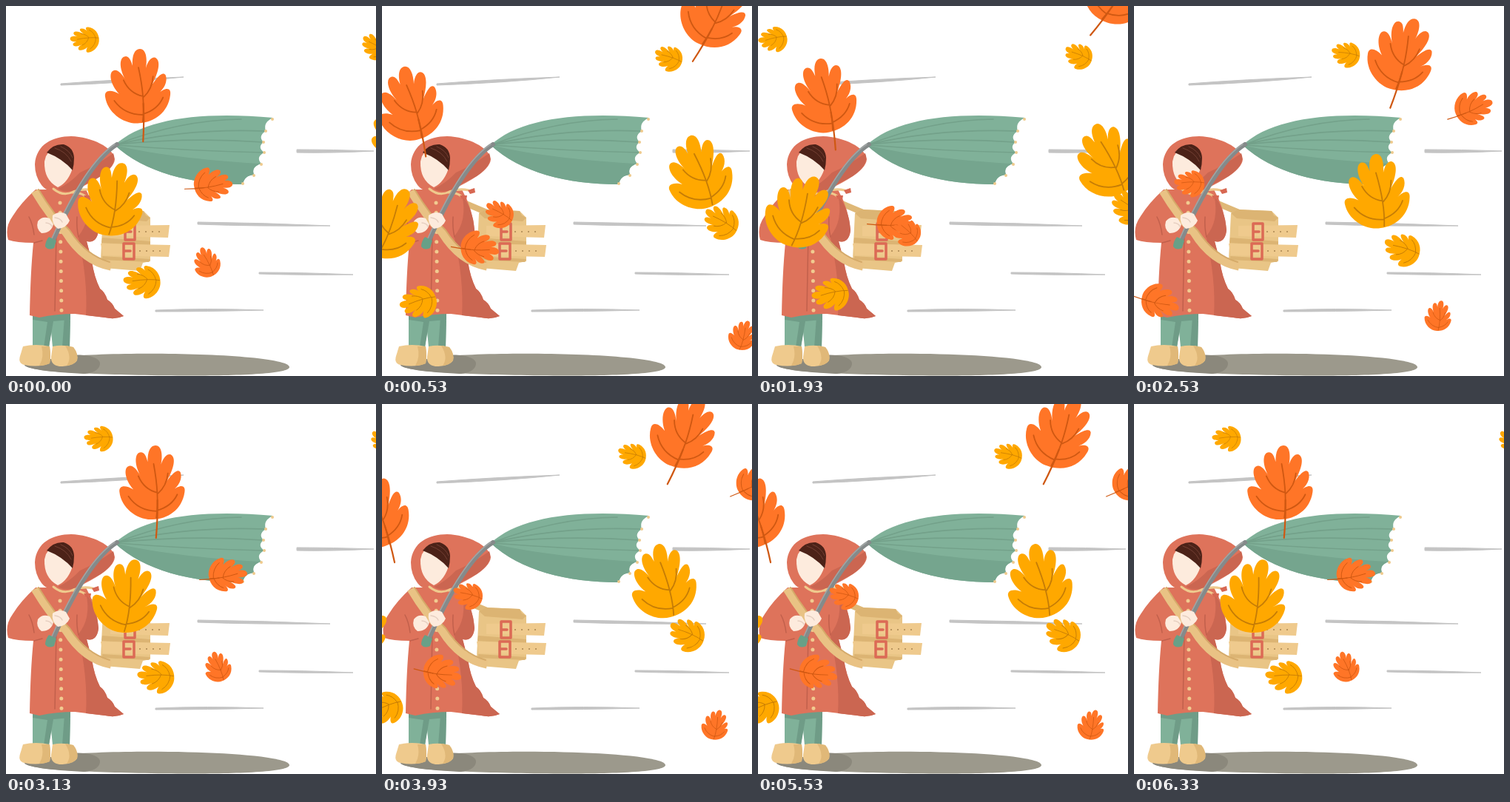
An HTML page for the animation above (6410 ms loop, 500 by 500 pixels).

```html
<!DOCTYPE html>
<html lang="en">
<head>
<meta charset="utf-8">
<title>Autumn wind</title>
<style>
html, body { margin: 0; width: 100%; height: 100%; overflow: hidden; background: #fff; }
svg { display: block; width: 100vw; height: 100vh; }
.line { fill: none; stroke-linecap: round; stroke-linejoin: round; }
.orange { color: #ff7527; --vein: #cf5812; }
.yellow { color: #ffa800; --vein: #c57c06; }
</style>
</head>
<body>
<svg viewBox="0 0 500 500">
  <defs>
    <g id="leaf">
      <path fill="currentColor" d="M0 50C-20 51 -42 34 -44 12C-45 3 -36 2 -25 9C-37 -5 -38 -22 -30 -23C-25 -24 -20 -18 -15 -9C-24 -26 -22 -41 -14 -41C-9 -41 -7 -36 -5 -28C-5 -42 -1 -50 6 -50C14 -50 16 -38 13 -24C17 -36 24 -40 28 -36C34 -30 28 -14 20 -1C30 -14 36 -18 39 -13C42 -4 36 6 27 12C38 3 46 4 44 14C40 38 20 50 0 50Z"/>
      <path class="line" stroke="var(--vein)" stroke-width="1.8" d="M3 -25Q10 18 5 48M6 39Q-19 38 -32 18M6 38Q26 33 34 17M7 14Q-11 9 -18 -9M8 15Q20 5 22 -12"/>
    </g>
    <g id="stemmed">
      <use href="#leaf"/>
      <path class="line" stroke="var(--vein)" stroke-width="2.2" d="M7 24Q7 48 4 75"/>
    </g>
  </defs>

  <path fill="#c4c4c4" stroke="#c4c4c4" d="M74 105Q150 99 240 96Q165 104 74 107ZM393 194Q440 194 497 196Q440 199 393 198ZM259 292Q350 293 438 297Q340 298 259 295ZM342 360Q400 360 469 363Q400 364 342 362ZM202 411Q270 408 348 411Q270 413 202 413Z"/>

  <path fill="#9c998c" d="M75 474C170 465 383 470 383 488C383 503 200 500 120 497C70 495 30 492 25 485Z"/>
  <path fill="#8b887c" d="M75 474C100 468 127 473 127 483C127 492 115 497 105 497C60 495 25 490 25 485Z"/>

  <!-- legs and boots -->
  <path fill="#80b199" d="M36 414H87L86 461H63L61 440L58 461H36Z"/>
  <path fill="#6f9c87" d="M36 416H87V424L64 426L58 461H51L56 427L36 424ZM79 420H87L86 461H76Z"/>
  <path fill="#efca8d" d="M23 460Q40 456 59 460Q61 474 59 483Q44 489 25 485Q16 483 19 473Z"/>
  <path fill="#efca8d" d="M63 460Q77 457 91 461Q98 470 96 479Q90 487 72 487Q60 485 61 474Z"/>
  <path fill="#e0b878" d="M48 460L59 460Q61 474 59 483Q53 486 45 486Q52 474 48 460ZM80 459L91 461Q98 470 96 479Q92 485 82 486Q90 475 80 459Z"/>

  <!-- satchel -->
  <path class="line" stroke="#dfb877" stroke-width="8" d="M102 262Q120 270 142 279"/>
  <path fill="#e9c586" d="M131 280L140 275L186 277L195 286V345L185 347L181 358L133 354L128 342Z"/>
  <path fill="#dcb473" d="M131 280L140 275L186 277L189 283L195 286L190 291L139 287ZM130 313L195 318V324L129 320ZM130 338L195 342L193 346L130 343Z"/>
  <path fill="#efca8d" d="M141 297L221 296L219 313L141 311ZM128 321L222 323L220 339L131 337Z"/>
  <path class="line" stroke="#a88450" stroke-width="2" stroke-dasharray="0 9" d="M180 305H216M181 331H216"/>
  <path class="line" stroke="#dc6a55" stroke-width="3.5" d="M161 294H174V316H161ZM159 321H173V342H159ZM161 305H169M159 331H168"/>

  <!-- coat -->
  <path fill="#de735b" d="M40 248L108 248Q123 275 125 303Q123 321 109 318L116 345Q119 366 127 382Q134 387 137 397Q144 401 147 409L159 419Q148 424 134 421L93 416Q68 416 45 421L32 418Q33 360 37 320Q14 320 3 316Q-2 299 9 284Q20 266 40 248Z"/>
  <path fill="#cb6651" d="M97 309L109 318L116 345Q119 366 127 382Q134 387 137 397Q144 401 147 409L159 419Q148 424 134 421L108 418Q111 370 97 309ZM108 255Q123 275 125 303Q123 321 109 318L97 312Q116 290 108 255Z"/>
  <path class="line" stroke="#c1604c" stroke-width="1.5" d="M38 320L49 317M31 285Q36 294 38 309M68 308L66 412M96 285Q95 300 98 312"/>
  <path class="line" stroke="#f1cb90" stroke-width="5" stroke-dasharray="0 13.2" d="M73 266L75 412"/>
  <path class="line" stroke="#e9c284" stroke-width="11" style="stroke-linecap:butt" d="M39 250Q60 285 81 306Q105 345 142 352"/>
  <path class="line" stroke="#d5aa69" stroke-width="2" d="M44 248Q65 283 86 303Q108 337 140 346"/>

  <!-- hood and face -->
  <path fill="#de735b" d="M39 214C41 187 63 176 88 176C116 177 145 191 147 207C146 224 111 240 94 249C76 257 55 252 48 242Q39 230 39 214Z"/>
  <path fill="#cb6651" d="M145 199Q151 214 128 230Q106 241 93 249Q80 253 70 247Q86 240 100 225Q121 216 145 199Z"/>
  <path fill="#fdebdd" d="M54 203Q60 191 75 190Q91 198 91 216Q85 238 70 245Q51 235 52 210Z"/>
  <path fill="#4c2218" d="M55 198Q64 186 78 187Q91 191 92 205Q92 214 90 222Q76 206 55 198Z"/>
  <path class="line" stroke="#744034" stroke-width="1" d="M66 192Q82 197 88 210M74 190Q86 195 90 205"/>
  <path class="line" stroke="#efca8d" stroke-width="3" d="M64 247Q77 258 91 251Q104 246 117 249M90 252Q101 252 107 257"/>
  <path fill="#d76752" d="M116 249L125 246L126 252L119 254ZM105 256L115 256L114 262L107 260Z"/>

  <!-- umbrella -->
  <path fill="#80b199" d="M147 188C185 152 265 142 361 151Q347 157 351 169Q340 176 348 184Q339 191 349 198Q337 204 345 213Q331 217 335 228Q322 229 320 241C250 241 187 225 147 188Z"/>
  <path fill="#75a58e" d="M147 188C205 202 285 210 345 213Q331 217 335 228Q322 229 320 241C250 241 187 225 147 188Z"/>
  <path class="line" stroke="#73a18a" stroke-width="1.6" d="M150 187Q235 154 318 153M150 187Q245 165 350 169M150 187Q250 177 347 184M150 188Q250 196 348 198"/>
  <path class="line" stroke="#efca8d" stroke-width="4" d="M360 153h0M351 169h0M348 184h0M349 198h0M345 214h0M335 229h0M320 240h0"/>
  <path class="line" stroke="#858a8a" stroke-width="6" d="M150 187Q111 211 64 316"/>
  <path class="line" stroke="#a0a5a4" stroke-width="1.5" d="M147 187Q108 211 62 314"/>
  <path fill="#68a087" d="M58 312L68 317L65 327Q57 331 53 325Q53 318 58 312Z"/>
  <path fill="#fdebdd" d="M43 291Q49 283 59 287L64 295Q61 307 48 307Q40 301 43 291ZM63 283Q72 276 81 281L86 290Q82 300 70 301Q61 294 63 283Z"/>
  <path class="line" stroke="#e6cfc0" stroke-width="1.5" d="M54 293Q61 294 62 298M66 286Q74 287 76 292"/>

  <g id="leaves"></g>
</svg>
<script>
const LOOP = 6410, CYCLE = 1600, FLIGHT = 2800;
const EARLY = -70, LATE = 330;

// A leaf drifts along one curve while its tilt bends from the first to the last angle.
const leaf = (kind, shape, size, start, curve, tilt) => {
  const route = document.createElementNS("http://www.w3.org/2000/svg", "path");
  route.setAttribute("d", curve);
  return { kind, shape, size, start, route, tilt, length: route.getTotalLength() };
};

const leaves = [
  leaf("orange", "stemmed", 1, EARLY, "M548 -83C286 183 244 49 -90 170", [48, -4, -25]),
  leaf("yellow", "leaf", .39, EARLY, "M510 51C291 121 73 -28 -146 95", [-55, -88, -115]),
  leaf("yellow", "leaf", 1, EARLY, "M545 175C202 339 234 176 -110 341", [-35, 5, 38]),
  leaf("orange", "stemmed", .52, LATE, "M580 48C326 255 141 262 -70 505", [54, 86, 118]),
  leaf("orange", "leaf", .41, LATE, "M520 453C297 402 206 270 -33 202", [20, 0, -145]),
  leaf("yellow", "leaf", .5, EARLY, "M568 230C357 372 158 361 -74 434", [-35, -88, -118])
];

// Gentle gust: fastest halfway through the flight.
const SWING = .875;
const gust = u => (1 + Math.sin(SWING * (2 * u - 1)) / Math.sin(SWING)) / 2;
const bend = ([a, b, c], u) => (1 - u) ** 2 * a + 2 * u * (1 - u) * b + u * u * c;

function drawLeaf({ kind, shape, size, start, route, tilt, length }, age) {
  const u = (age - start) / FLIGHT;
  if (u < 0 || u > 1) return "";
  const { x, y } = route.getPointAtLength(length * gust(u));
  return `<use href="#${shape}" class="${kind}" transform="translate(${x} ${y}) rotate(${bend(tilt, u)}) scale(${size})"/>`;
}

const layer = document.getElementById("leaves");
const origin = performance.now();
let shown = -1;

function frame(now) {
  const t = Math.max(0, now - origin) % LOOP;
  // Poses are held alternately for 30 and 70 ms.
  const held = Math.min(6330, Math.floor(t / 100) * 100 + (t % 100 >= 30 ? 30 : 0));
  if (held !== shown) {
    shown = held;
    const phase = held % CYCLE;
    layer.innerHTML = leaves.map(item =>
      [-1, 0, 1].map(k => drawLeaf(item, phase + k * CYCLE)).join("")).join("");
  }
  requestAnimationFrame(frame);
}
frame(origin);
</script>
</body>
</html>
```
